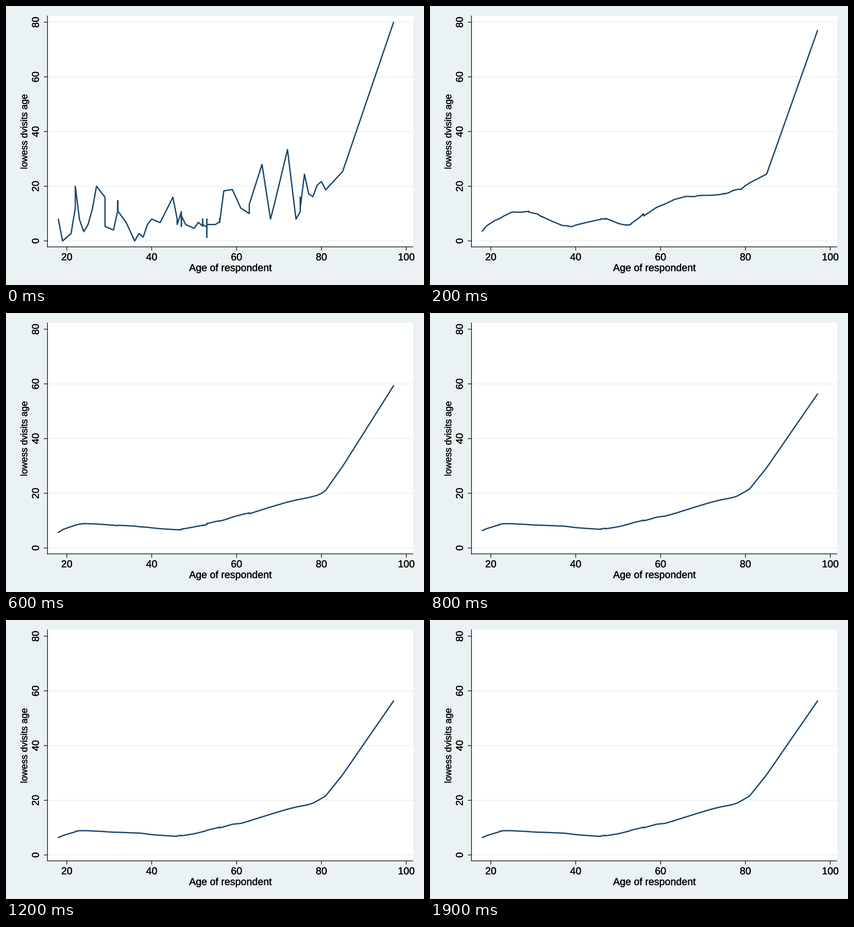
Recreate the animation shown at these times as a matplotlib script. Size 917 by 611 pixels, loop 2 s.

```python
import numpy as np
import matplotlib.pyplot as plt
from matplotlib import patheffects
from matplotlib.animation import FuncAnimation
from matplotlib.patches import Rectangle

W, H, DPI = 917, 611, 100
FRAMES, STEP = 20, 100
PAPER, NAVY, INK = "#eaf2f3", "#1a476f", "#000000"
LEFT, RIGHT, TOP, BOTTOM = 91, 893, 21, 527.5

# Runs of consecutive ages: first age, then visits (a tuple for a shared age)
RUNS = [
    (18, 8, 0), (21, 2.7, (12, 20), 7.7, 3.4, 6, 11.5, 20), (29, (16, 5.3)),
    (31, 4, (11, 14.7, 11)), (34, 6.7), (36, 0, 2.7, 1.4, 6, 8), (42, 6.7),
    (45, 16, (8, 6), (10.7, 5.3, 9.2), 6),
    (50, 4.6, 6.8, (5.4, 8, 6), (5.1, 8, 1.3, 6)), (55, 6, (7, 8, 6.7), 18.3),
    (59, 18.8, 15.4, 12), (63, (10, 13.4)), (66, 28), (68, 8, 14), (72, 33.4),
    (74, 8, (10.7, 16, 12), 24.4, 17.2, 16.2, 20.4, 21.7, 18.7),
    (85, 25.4), (97, 80),
]
AGE, VISITS = np.array([
    (first + i, v) for first, *run in RUNS
    for i, item in enumerate(run) for v in np.atleast_1d(item)
], float).T
HEADS = np.where(AGE == AGE.max(), 1, 3)   # respondents behind each value
MAX_BAND = 0.8


def lowess(x, y, reach):
    """Local linear fit, tricube weights, window of `reach` values each side."""
    fit = np.empty_like(y)
    for i in range(len(x)):
        win = slice(max(0, i - reach), i + reach + 1)
        d = x[win] - x[i]
        w = HEADS[win] * (1 - (abs(d) / (1.0001 * abs(d).max())) ** 3) ** 3
        w /= w.sum()
        mx, my = w @ d, w @ y[win]
        slope = (w @ ((d - mx) * (y[win] - my))) / (w @ (d - mx) ** 2)
        fit[i] = my - slope * mx
    return fit


def curve(n):
    """The band widens by 0.1 a frame, then stays; shared ages get reshuffled."""
    if n == 0:
        return AGE, VISITS
    shuffle = np.random.default_rng(n).random(len(AGE))
    order = np.lexsort((shuffle, AGE))
    band = min(0.1 * (n + 1), MAX_BAND)
    return AGE, lowess(AGE, VISITS[order], round(23 * band))


def px(age):
    return 133.4 + 9.31 * (age - 20)


def py(val):
    return 514.5 - 5.9875 * val


def pt(pixels):
    return pixels * 72 / DPI


def rule(xs, ys, color=INK, width=1.4, z=3):
    return ax.plot(xs, ys, color=color, lw=pt(width), zorder=z, snap=False,
                   solid_capstyle="butt")[0]


def label(x, y, s, size, angle=0):
    bold = patheffects.withStroke(linewidth=pt(0.4), foreground=INK)
    ax.text(x, y, s, fontsize=pt(size), rotation=angle, color=INK,
            ha="center", va="baseline", rotation_mode="anchor",
            path_effects=[bold])


plt.rcParams["font.family"] = "Liberation Sans"
fig = plt.figure(figsize=(W / DPI, H / DPI), dpi=DPI, facecolor=PAPER)
ax = fig.add_axes([0, 0, 1, 1])
ax.set_xlim(0, W)
ax.set_ylim(H, 0)
ax.axis("off")

ax.add_patch(Rectangle((LEFT, TOP), RIGHT - LEFT, BOTTOM - TOP,
                       facecolor="white", lw=0, zorder=0))
rule([LEFT, LEFT], [TOP, BOTTOM + 0.7])
rule([LEFT - 0.7, RIGHT], [BOTTOM, BOTTOM])

for v in range(0, 81, 20):
    top_grid = rule([LEFT, RIGHT], [py(v)] * 2, PAPER, 2, 1)
    rule([83, LEFT], [py(v)] * 2)
    label(72, py(v), str(v), 21.6, 90)
for a in range(20, 101, 20):
    rule([px(a)] * 2, [BOTTOM, 535.5])
    label(px(a), 557, str(a), 22.2)
label(46.5, 275, "lowess dvisits age", 20.4, 90)
label(492, 580.5, "Age of respondent", 22.2)

line, = ax.plot([], [], color=NAVY, lw=pt(2.9), zorder=4,
                solid_capstyle="round", solid_joinstyle="round")


def draw(n):
    ages, visits = curve(n)
    line.set_data(px(ages), py(visits))
    top_grid.set_visible(visits.max() > 65)
    return line, top_grid


anim = FuncAnimation(fig, draw, frames=FRAMES, interval=STEP,
                     init_func=lambda: draw(0), repeat=True, repeat_delay=0)
plt.show()
```
